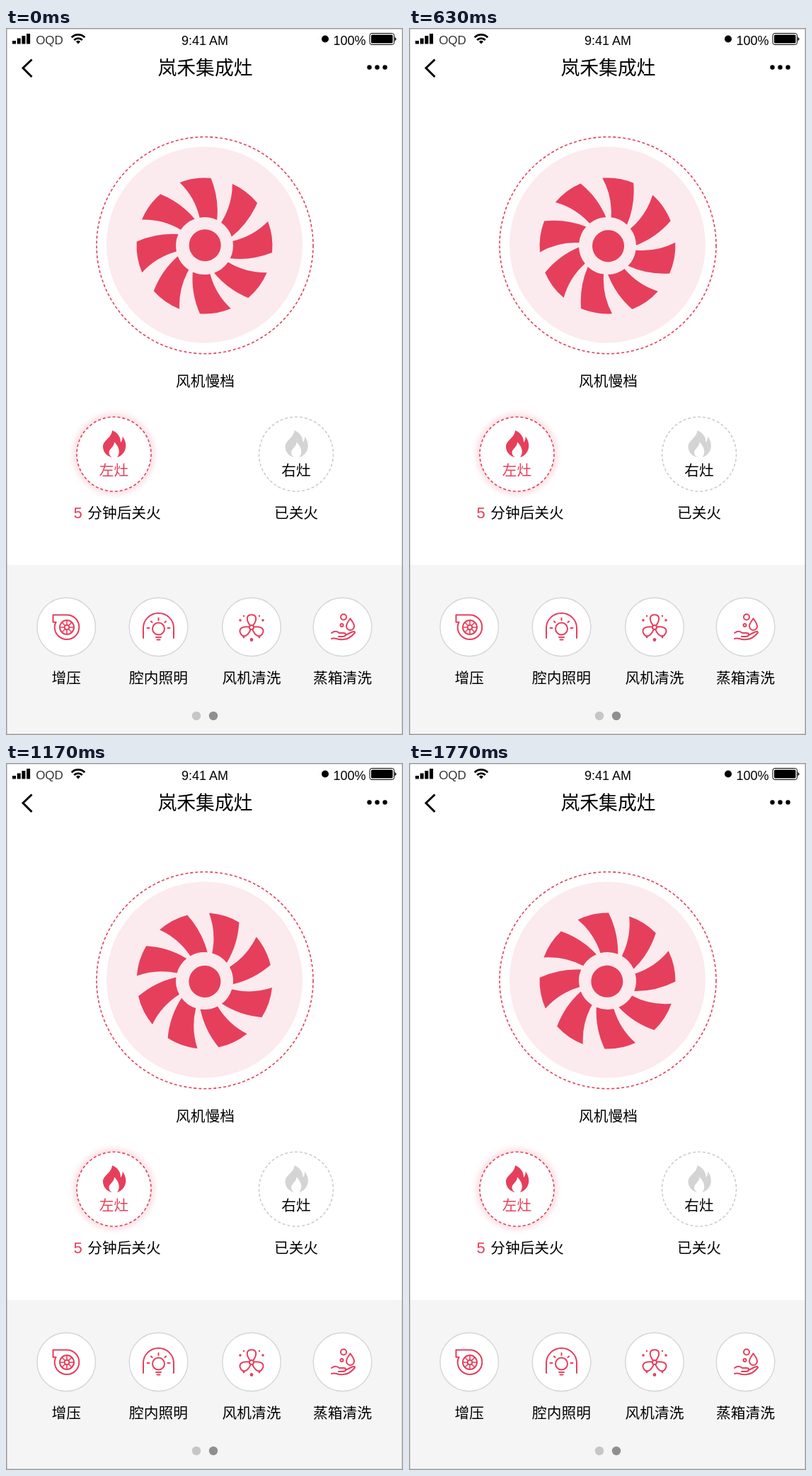
Recreate the animation shown at these times as an HTML page. Size 561 px wide and 998 px high, loop 1800 ms.

```html
<!DOCTYPE html>
<html lang="zh-CN">
<head>
<meta charset="utf-8">
<style>
  html, body { margin: 0; width: 100%; height: 100%; overflow: hidden; background: #fff; }
  svg { display: block; width: 561px; height: 998px; }
  text { font: 20.7px "Noto Sans CJK SC", "Noto Sans CJK", sans-serif; text-anchor: middle; }
  .latin { font-family: "Liberation Sans", Arial, sans-serif; font-size: 18px; }
  .red { fill: #e63f5c; }
  .icon { fill: none; stroke: #e63f5c; stroke-width: 2; stroke-linecap: round; stroke-linejoin: round; }
  .dash { fill: none; stroke: #e63f5c; stroke-width: 1.6; stroke-dasharray: 4 3; }
</style>
</head>
<body>
<svg viewBox="0 0 561 998">
  <defs>
    <filter id="glow" x="-30%" y="-30%" width="160%" height="160%"><feGaussianBlur stdDeviation="4"/></filter>
    <path id="flame" d="M-3 568C6 572 9 578 9 585C11 583 12 580 11.500 576.500C17 583 18 593 13.500 599C11 602.500 8 605 4 606C9 600 7 591 0 584.500C0 592 -8 594 -7.500 600C-7 603 -5 605 -3 606C-11 604.500 -16 598 -16 591C-16 582 -4 579 -3 568Z"/>
  </defs>

  <!-- status bar -->
  <path d="M9 18h5v4.500h-5zM15.700 14.500h5v8h-5zM22.400 11h5v11.500h-5zM29.100 8h5v14.500h-5z"/>
  <text class="latin" x="61.500" y="23" style="font-size:17px" fill="#333">OQD</text>
  <g fill="none" stroke="#000" stroke-width="2.800">
    <path d="M92.700 13.300a13.200 13.200 0 0 1 18.600 0M96.200 17a8.200 8.200 0 0 1 11.600 0"/>
    <path d="M102 22.500l-3-3.200a4.300 4.300 0 0 1 6 0z" fill="#000" stroke="none"/>
  </g>
  <text class="latin" x="281" y="24">9:41 AM</text>
  <circle cx="451" cy="15.500" r="5"/>
  <text class="latin" x="485.500" y="24">100%</text>
  <rect x="514" y="7.500" width="34.500" height="16" rx="3" fill="none" stroke="#000"/>
  <rect x="516" y="9.500" width="30.500" height="12" rx="1.500"/>
  <path d="M549.500 13q2 .5 2 2.500t-2 2.500z"/>

  <!-- title bar -->
  <path d="M36.500 44.500L24 56.500l12.500 12.500" fill="none" stroke="#000" stroke-width="3"/>
  <text x="281.500" y="66" style="font-size:26.800px">岚禾集成灶</text>
  <circle cx="513.500" cy="55.500" r="3.200"/><circle cx="524.500" cy="55.500" r="3.200"/><circle cx="535.500" cy="55.500" r="3.200"/>

  <!-- fan -->
  <circle cx="281" cy="306.700" r="153" class="dash"/>
  <circle cx="280.500" cy="306" r="138.500" fill="#fbeaee"/>
  <g id="fan" class="red"><circle cx=".7" cy="-.8" r="22.500"/></g>
  <text x="281.500" y="506">风机慢档</text>

  <!-- burners -->
  <circle cx="152.500" cy="601.500" r="53" fill="none" stroke="#e63f5c" stroke-width="6" opacity=".25" filter="url(#glow)"/>
  <circle cx="152.500" cy="601.500" r="52.500" class="dash" style="fill:#fff"/>
  <use href="#flame" x="153" class="red"/>
  <text x="152.500" y="632" class="red">左灶</text>
  <text x="101.500" y="692" class="latin red" style="font-size:22px">5</text>
  <text x="167" y="692">分钟后关火</text>
  <circle cx="410" cy="601.500" r="52.500" class="dash" style="stroke:#ccc"/>
  <use href="#flame" x="410.500" fill="#d4d4d4"/>
  <text x="410" y="632">右灶</text>
  <text x="410" y="692">已关火</text>

  <!-- shortcuts -->
  <path d="M0 758h561v240H0z" fill="#f5f5f5"/>
  <g id="discs" fill="#fff" stroke="#d6d6d6" stroke-width="1.400"></g>
  <g class="icon">
    <path d="M66.500 828.500H86a17.300 17.300 0 1 1-17.300 17.300q0-4 2-7h-4.200z"/>
    <circle cx="86" cy="846" r="10"/><circle cx="86" cy="846" r="3.300"/>
    <g id="spokes" stroke-width="1.600"></g>
  </g>
  <g class="icon">
    <path d="M194 861v-14a21.500 21 0 0 1 43 0v14"/>
    <circle cx="215.500" cy="848" r="8.500"/>
    <path d="M212 860h7M213.500 863.500h4M215.500 833v3M205 837.500l1.500 1.500M226 837.500l-1.500 1.500M199.500 847h3M228.500 847h3"/>
  </g>
  <g class="icon">
    <g id="petals"></g>
    <circle cx="347" cy="846" r="3" fill="#fff"/>
  </g>
  <g id="drops" class="red"></g>
  <g class="icon" stroke-width="1.800">
    <circle cx="477" cy="831.500" r="4"/><circle cx="474.500" cy="843" r="2"/>
    <path d="M486.500 833.500c2.500 4 5.500 7 5.500 11a5.500 5.500 0 0 1-11 0c0-4 3-7 5.500-11z"/>
    <path d="M460 854q6-4.500 11 0h6q3.500 0 3 2.500t-4 2.500h-6M480 857l9-4.500q4-1.500 4 1-8 9.500-16 9.500-5 1-10-1-4-1-7 0"/>
  </g>
  <g id="labels"></g>
  <circle cx="269" cy="971" r="6.200" fill="#c6c6c6"/>
  <circle cx="293" cy="971" r="6.200" fill="#8f8f8f"/>

  <rect x=".5" y=".5" width="560" height="997" fill="none" stroke="#999" stroke-width="2"/>
</svg>
<script>
const $ = id => document.getElementById(id);
const add = (id, html) => $(id).innerHTML += html;

const items = [[85.2, '增压'], [215.5, '腔内照明'], [347, '风机清洗'], [475.5, '蒸箱清洗']];
for (const [x, label] of items) {
  add('discs', `<circle cx="${x}" cy="845.500" r="41.300"/>`);
  add('labels', `<text x="${x}" y="925">${label}</text>`);
}

const blade = 'M-34.500 -89.500A95.900 95.900 0 0 1 9.500 -95.500Q21 -67 17.800 -36.400A40.500 40.500 0 0 0 -6.700 -39.900Q-13.600 -69 -34.500 -89.500Z';
for (let i = 0; i < 8; i++) {
  // the blades sit slightly off an even spacing
  const turn = 45 * i - 1 + 1.3 * Math.cos((i - 1.2) * Math.PI / 4);
  add('fan', `<path d="${blade}" transform="rotate(${turn})"/>`);
  add('spokes', `<path d="M86 842.500v-6" transform="rotate(${45 * i} 86 846)"/>`);
}
for (let i = 0; i < 3; i++)
  add('petals', `<path d="M345 843.500c-3-4-5-8-4-11.500 1.500-5 10.500-5 12 0 1 3.500-1 7.500-4 11.500" transform="rotate(${120 * i} 347 846)"/>`);
for (const [x, y, r] of [[16, 836, 1.8], [11, 830, 1.2], [11, 860, 1.4], [0, 863.5, 2.2]])
  for (const side of [-1, 1])
    add('drops', `<circle cx="${347 + side * x}" cy="${y}" r="${r}"/>`);

// half a turn per loop, in 60 steps
const LOOP = 1800, STEP = 30;
function draw() {
  const step = Math.floor(performance.now() % LOOP / STEP + 1e-3);
  $('fan').setAttribute('transform', `translate(280.500 307.500) rotate(${step * 3})`);
  requestAnimationFrame(draw);
}
draw();
</script>
</body>
</html>
```
